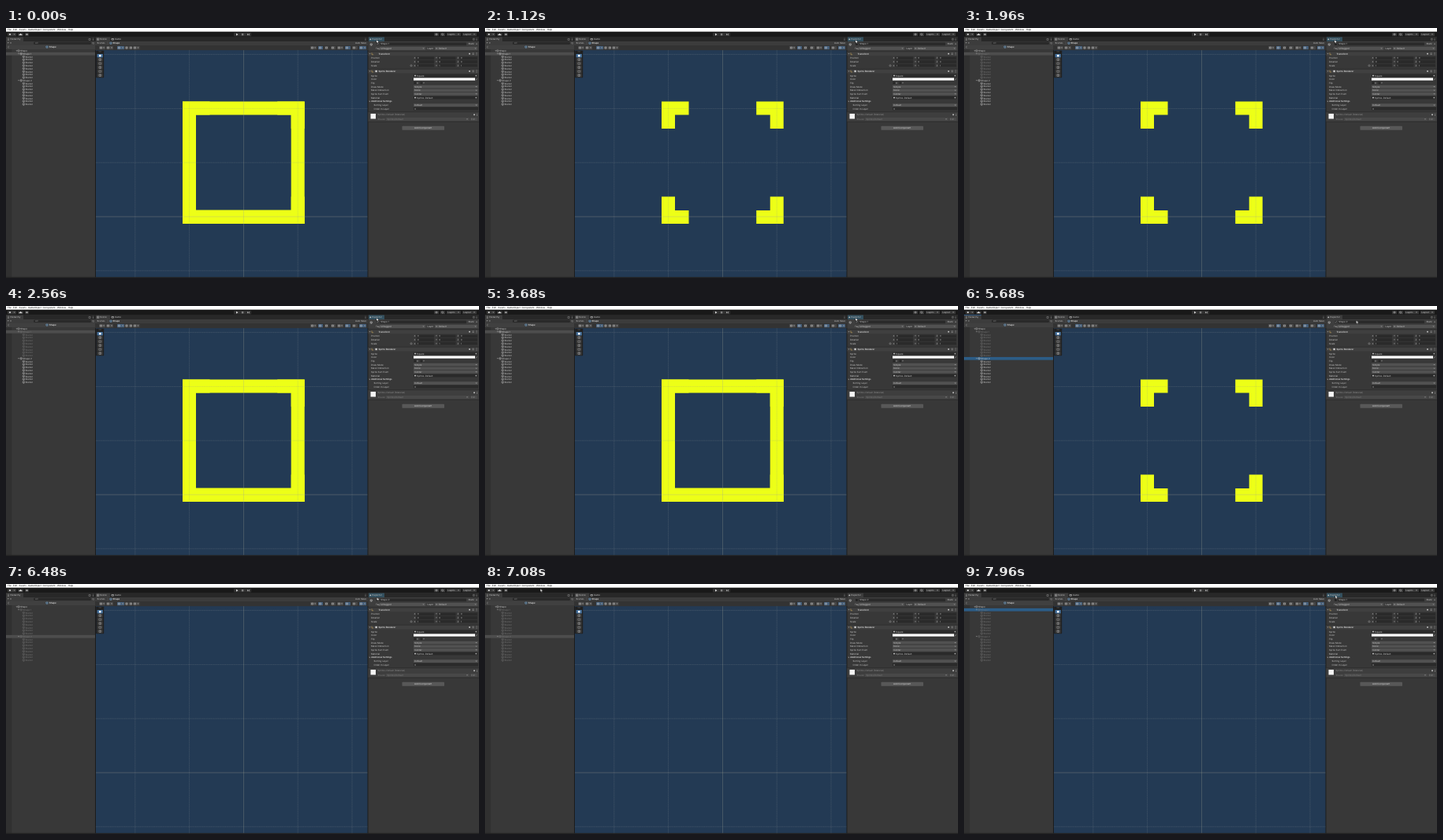
An HTML page for the animation above (8000 ms loop, 600 px wide and 318 px high).

```html
<!DOCTYPE html>
<html lang="en">
<head>
<meta charset="utf-8">
<title>Editor scene</title>
<style>
html, body { margin: 0; width: 100%; height: 100%; overflow: hidden; background: #383838; }
svg { display: block; width: 100vw; height: 100vh; }
text { font: 2.9px Inter, sans-serif; fill: #c4c4c4; text-rendering: geometricPrecision; white-space: pre; }
</style>
</head>
<body>
<svg id="stage" viewBox="0 0 600 318"></svg>
<script>
const LOOP = 8000;
const stage = document.getElementById('stage');
let layer = stage;

function add(tag, attrs, content) {
  const el = document.createElementNS('http://www.w3.org/2000/svg', tag);
  for (const key in attrs) el.setAttribute(key, attrs[key]);
  if (content) el.textContent = content;
  layer.append(el);
  return el;
}
const box = (x, y, w, h, fill, extra) => add('rect', { x, y, width: w, height: h, fill, ...extra });
const path = (d, fill, extra) => add('path', { d, fill, ...extra });
const stroke = (d, color, width = 0.5, extra) =>
  path(d, 'none', { stroke: color, 'stroke-width': width, ...extra });
// y is the vertical middle of the line of text
const label = (x, y, content, style = '') => add('text', { x, y: y + 1.05, style }, content);
const bold = 'font-weight:600;fill:#d8d8d8';

function group(draw) {
  const outer = layer;
  const g = add('g', {});
  layer = g;
  draw();
  layer = outer;
  return g;
}

// steps: [ms, value]; each value holds until the next step
function hold(el, prop, steps) {
  const frames = steps.map(([ms, value]) => ({ offset: ms / LOOP, [prop]: value, easing: 'step-end' }));
  frames.push({ ...frames.at(-1), offset: 1 });
  el.animate(frames, { duration: LOOP, iterations: Infinity });
}

const T = {
  off1: 1110, dim1: 1230, on: 2550, lit: 2680, off2: 3690, dim2: 3810,
  press: 4710, select2: 4830, empty: 6190, dimAll: 6310, select1: 7470
};
const squareSteps = [[0, 1], [T.off1, 0], [T.on, 1], [T.off2, 0]];
const cornerSteps = [[0, 1], [T.empty, 0]];
const BRIGHT = '#c4c4c4', DIM = '#717171', GRAY = '#4d4d4d', BLUE = '#2c5d87';
const firstTree = [[0, BRIGHT], [T.dim1, DIM], [T.lit, BRIGHT], [T.dim2, DIM]];
const secondTree = [[0, BRIGHT], [T.dimAll, DIM]];

function cube(x, y, color = '#b0b0b0') {
  return stroke(`M${x} ${y - 1.4}l1.3 .7v1.4l-1.3 .7-1.3-.7v-1.4zm0 1.4v1.4m0-1.4l1.3-.7m-1.3 .7l-1.3-.7`, color, 0.4);
}
const arrow = (x, y) => path(`M${x - 1} ${y - .6}h2l-1 1.4z`, '#999');
const dots = (x, y) => [-1.2, 0, 1.2].forEach(d => box(x - .35, y + d - .3, .7, .6, '#b5b5b5'));

function field(x, y, w, content, fill = '#2a2a2a') {
  box(x, y - 1.9, w, 3.8, fill, { rx: .4 });
  if (content) label(x + 1.3, y, content);
}
function dropdown(x, y, w, content) {
  field(x, y, w, content, '#515151');
  arrow(x + w - 2.5, y);
}

function topBars() {
  box(0, 0, 600, 4.8, '#fff');
  [[2, 'File'], [9, 'Edit'], [16.5, 'Assets'], [28, 'GameObject'], [46.5, 'Component'], [65, 'Window'], [79, 'Help']]
    .forEach(([x, name]) => label(x, 2.4, name, 'fill:#111'));
  box(0, 4.8, 600, 6.4, '#191919');
  box(2, 6.2, 11, 4, '#383838', { rx: .5 });
  add('circle', { cx: 5, cy: 8.2, r: 1.1, fill: '#ccc' });
  arrow(10.5, 8.2);
  box(15, 6.2, 7, 4, '#303030', { rx: .5 });
  path('M16.5 9.3q-.5-1.5 1-1.4 1-1.8 2.1 0 1.5 0 .9 1.4z', '#d5d5d5');
  box(24, 6.2, 5, 4, '#303030', { rx: .5 });
  box(25.2, 7.2, 2.6, 2, '#999');
  box(289, 6, 22, 4.6, '#303030', { rx: .5 });
  path('M292 6.8l2.5 1.5-2.5 1.5z', '#d5d5d5');
  path('M299 7h.8v2.6h-.8zm1.5 0h.8v2.6h-.8zM306 7l2 1.3-2 1.3zm2.2 0h.7v2.6h-.7z', '#aaa');
  [[543, 6], [551, 6], [559, 18], [579, 18]].forEach(([x, w]) => box(x, 6.2, w, 4, '#383838', { rx: .5 }));
  stroke('M545 7.3h2v1.6h-2z M553.6 7.1a1 1 0 1 0 .1 0m.6 1.7l.8.8', '#c4c4c4');
  label(560.5, 8.2, 'Layers');
  label(580.5, 8.2, 'Layout');
  arrow(574, 8.2);
  arrow(594, 8.2);
}

function hierarchy() {
  box(0, 11.2, 113, 306, '#383838');
  box(0, 11.2, 113, 5.8, '#282828');
  box(0, 11.6, 22, 5.4, '#3c3c3c');
  const focus = box(0, 11.4, 22, .6, '#3a79bb');
  hold(focus, 'opacity', [[0, 0], [T.press, 1], [T.empty, 0], [T.select1, 1], [7900, 0]]);
  stroke('M2 13.2h2m-2 1.2h2m-2 1.2h2', '#b5b5b5', .4);
  label(5.2, 14.3, 'Hierarchy');
  stroke('M105 13.5h2.2v2h-2.2z', '#aaa', .4);
  dots(110.5, 14.3);
  box(0, 17, 113, 4.5, '#3c3c3c');
  label(1.5, 19, '+', 'font-size:4px');
  arrow(6, 19.2);
  box(35, 17.5, 73, 3.5, '#292929', { rx: 1.5 });
  label(37, 19.2, 'All', 'fill:#888');
  stroke('M110.5 18.3a.9.9 0 1 0 .1 0m.5 1.5l.7.7', '#aaa', .4);
  box(0, 21.5, 113, 5.5, '#404040');
  stroke('M3.8 23l-1.3 1.2 1.3 1.2', '#aaa');
  cube(52, 24.1, '#7bb5e8');
  label(54.8, 24.1, 'Shape', bold);
  box(0, 27, 7.3, 290, '#303030');

  const pitch = 3.78, top = 29;
  const rowY = i => top + i * pitch;
  const highlight = (row, steps) => {
    const bar = box(0, rowY(row) - pitch / 2, 113, pitch, GRAY);
    hold(bar, 'fill', steps);
  };
  highlight(1, [[0, GRAY], [T.press, 'transparent'], [T.select1, BLUE]]);
  highlight(10, [[0, 'transparent'], [T.press, GRAY], [T.select2, BLUE], [T.empty, GRAY], [T.select1, 'transparent']]);
  const hover = group(() => {
    stroke(`M1 ${rowY(10)}q1.2-1.6 2.4 0-1.2 1.6-2.4 0M5 ${rowY(10) - 1}v2h1.2v-2`, '#aaa', .4);
  });
  hold(hover, 'opacity', [[0, 0], [4580, 1], [5320, 0]]);

  arrow(13.5, top);
  cube(16, top);
  label(18.2, top, 'Shape');
  [firstTree, secondTree].forEach((steps, n) => {
    for (let i = 0; i < 9; i++) {
      const y = rowY(1 + n * 9 + i);
      const indent = i ? 3.2 : 0;
      if (!i) arrow(16, y);
      const icon = cube(19.2 + indent, y);
      const name = label(21.6 + indent, y, i ? 'Border' : `Shape ${n + 1}`);
      hold(icon, 'stroke', steps);
      hold(name, 'fill', steps);
    }
  });
}

function scene() {
  box(114, 28, 344.5, 289, '#233a54');
  const yellow = '#edff17';
  const square = path('M224 93.5H378.7V249H224ZM241 110.5V231.5H361.7V110.5Z', yellow, { 'fill-rule': 'evenodd' });
  hold(square, 'opacity', squareSteps);
  const corners = group(() => {
    for (const [x, sx] of [[224, 1], [378.7, -1]])
      for (const [y, sy] of [[93.5, 1], [249, -1]])
        path('M0 0H34.5V17H17V34.5H0Z', yellow, { transform: `translate(${x} ${y}) scale(${sx} ${sy})` });
  });
  hold(corners, 'opacity', cornerSteps);

  const step = 68.8;
  for (let i = -2; i <= 2; i++) {
    const x = 301.4 + i * step, y = 240 + (i - 1) * step;
    const line = (d, axis) => stroke(d, axis ? '#a0a395' : '#8c9499', .6,
      axis ? { opacity: .55 } : { opacity: .43, 'stroke-dasharray': '1.2 .6' });
    line(`M${x} 28V317`, i === 0);
    if (y > 28) line(`M114 ${y}H458.5`, i === 1);
  }

  box(113, 11.2, 346, 5.8, '#282828');
  box(114, 11.6, 18, 5.4, '#3c3c3c');
  stroke('M115.5 13h2.4v2.6h-2.4zm1.2 0v2.6m-1.2-1.3h2.4', '#bbb', .4);
  label(119, 14.3, 'Scene');
  stroke('M134 13.5h2.6v1.6h-2.6z', '#ccc', .6);
  label(138, 14.3, 'Game');
  dots(456, 14.3);
  box(113, 17, 346, 5, '#3c3c3c');
  label(115.5, 19.3, 'Scenes');
  stroke('M128.5 17.5l1 1.8-1 1.8', '#666', .4);
  cube(133, 19.3, '#7bb5e8');
  label(135.5, 19.3, 'Shape', bold);
  label(443, 19.3, 'Auto Save');
  box(113, 22, 346, 6.2, '#333');

  const button = (x, w, active) => {
    box(x, 23, w, 4.3, active ? '#46607c' : '#484848', { rx: .5 });
    stroke(`M${x + 1.5} 24.2h2v1.9h-2z`, '#d0d0d0', .5);
    if (w > 7) arrow(x + w - 2, 25.2);
  };
  [[118, 8], [127, 9], [141, 9, 1], [150.5, 5], [156, 4], [161, 8.5],
   [386, 8], [396, 6, 1], [404, 5], [412, 6], [420, 8], [430, 7, 1], [439, 7], [448, 9, 1]]
    .forEach(b => button(...b));
  box(114.2, 28.7, 10, 34.5, '#202020', { rx: .6 });
  stroke('M117.5 30h3.5', '#666', .5);
  for (let i = 0; i < 6; i++) {
    const y = 35.2 + i * 5;
    box(115.6, y - 2.1, 7.3, 4.3, i ? '#383838' : '#46719c', { rx: .5 });
    if (i) stroke(`M118 ${y - 1.2}h2.6v2.4h-2.6z${i % 2 ? `M119.3 ${y - 1.8}v3.6` : ''}`, '#b5b5b5', .4);
    else path(`M118 ${y + 1}l.2-2.3h2.3v2.3l-1.2 .6z`, '#fff');
  }
}

function inspector() {
  box(459.5, 11.2, 140.5, 306, '#383838');
  box(459.5, 11.2, 140.5, 5.8, '#282828');
  box(460, 11.6, 20, 5.4, '#3c3c3c');
  const glow = box(460, 11.6, 20, 5.4, '#30576b');
  hold(glow, 'opacity', [[0, .75], [4240, 0], [6050, .75], [6840, 0], [7900, .75]]);
  add('circle', { cx: 462.3, cy: 14.3, r: .9, fill: '#ccc' });
  label(464, 14.3, 'Inspector');
  stroke('M592.5 13.3h1.8v2h-1.8z', '#aaa', .4);
  dots(597, 14.3);

  box(459.5, 17, 140.5, 11.5, '#3e3e3e');
  cube(463.3, 21, '#ddd');
  box(470, 18.9, 3, 3, '#252525', { rx: .3 });
  const check = stroke('M470.7 20.4l.7.8 1.2-1.7', '#ddd');
  hold(check, 'opacity', [[0, 1], [T.off1, 0], [T.on, 1], [T.off2, 0], [T.select2, 1], [T.empty, 0]]);
  field(474, 20.4, 110, '');
  const one = label(475.3, 20.4, 'Shape 1');
  const two = label(475.3, 20.4, 'Shape 2');
  hold(one, 'opacity', [[0, 1], [T.select2, 0], [T.select1, 1]]);
  hold(two, 'opacity', [[0, 0], [T.select2, 1], [T.select1, 0]]);
  label(586.5, 20.4, 'Static');
  arrow(597, 20.4);
  label(469, 26, 'Tag');
  dropdown(474, 26, 58, 'Untagged');
  label(534.5, 26, 'Layer');
  dropdown(544, 26, 54, '0: Default');

  const header = (y, name, check) => {
    box(459.5, y - 2.8, 140.5, 5.3, '#404040');
    stroke(`M459.5 ${y - 2.8}h140.5`, '#222', .5);
    arrow(461.5, y);
    stroke(`M464 ${y + 1}v-2.4m0 2.4h2.2`, '#c7a35b', .6);
    if (check) box(468.4, y - 1.2, 2.4, 2.4, '#ccc');
    label(472.6, y, name, bold);
    add('circle', { cx: 588, cy: y, r: 1, fill: '#bbb' });
    stroke(`M591.5 ${y - .8}h2.2m-2.2 1.6h2.2`, '#bbb', .5);
    dots(597, y);
  };
  header(32.8, 'Transform');
  ['Position', 'Rotation', 'Scale'].forEach((name, i) => {
    const y = 38.3 + i * 4.7;
    label(463, y, name);
    ['X', 'Y', 'Z'].forEach((axis, k) => {
      label(517.5 + k * 27.5, y, axis);
      field(520.5 + k * 27.5, y, 22.5, i === 2 ? '1' : '0');
    });
  });
  stroke('M513 46.9h2v1.8h-2z', '#aaa', .4);
  header(55, 'Sprite Renderer', true);

  const rowY = i => 60.6 + i * 4.67;
  ['Sprite', 'Color', 'Flip', 'Draw Mode', 'Mask Interaction', 'Sprite Sort Point', 'Material']
    .forEach((name, i) => label(463, rowY(i), name));
  [[0, 'Square'], [6, 'Sprites-Default']].forEach(([i, name]) => {
    field(517, rowY(i), 81, '');
    box(518.2, rowY(i) - .8, 1.6, 1.6, '#ddd');
    label(520.8, rowY(i), name);
    add('circle', { cx: 596.3, cy: rowY(i), r: .9, fill: '#aaa' });
  });
  box(517, rowY(1) - 1.8, 78, 3.2, '#fff');
  stroke('M596 66.4l1.6-1.9', '#ccc');
  ['X', 'Y'].forEach((axis, k) => {
    box(517.5 + k * 8, rowY(2) - 1.3, 2.6, 2.6, '#252525');
    label(521 + k * 8, rowY(2), axis);
  });
  ['Simple', 'None', 'Center'].forEach((name, i) => dropdown(517, rowY(3 + i), 82, name));
  arrow(461.3, 93.4);
  label(463.2, 93.4, 'Additional Settings', bold);
  label(466.5, 98.1, 'Sorting Layer');
  dropdown(517, 98.1, 82, 'Default');
  label(466.5, 102.7, 'Order in Layer');
  field(517, 102.7, 82, '0');

  box(459.5, 106.7, 140.5, 12.6, '#3e3e3e');
  stroke('M459.5 106.7h140.5M459.5 119.3h140.5', '#252525');
  box(462.5, 109, 6.5, 6.5, '#f5f5f5');
  label(471.5, 110.3, 'Sprites-Default (Material)', 'fill:#888');
  add('circle', { cx: 594, cy: 110.3, r: 1, fill: '#bbb' });
  dots(597.5, 110.3);
  label(471.5, 116, 'Shader', 'fill:#777');
  field(482, 116, 106, '', '#484848');
  label(483.5, 116, 'Sprites/Default', 'fill:#777');
  arrow(585, 116);
  field(589, 116, 9, '', '#484848');
  label(590, 116, 'Edit', 'fill:#888');
  box(502.5, 124.8, 53.5, 5, '#585858', { rx: .6 });
  label(518, 127.3, 'Add Component', 'fill:#e0e0e0');
}

function pointer() {
  const cursor = path('M0 0V4.1L1 3.2 1.7 4.7 2.4 4.4 1.8 3H3.1Z', '#fff', { stroke: '#000', 'stroke-width': .35 });
  const stops = [
    [0, 470, 15], [4120, 470, 15], [4240, 330, 4], [4380, 150, 12], [4560, 50, 61.5],
    [5240, 50, 61.5], [5400, 190, 48], [5640, 497.5, 18.3], [5900, 497.5, 18.3],
    [6060, 470.5, 17], [6820, 470.5, 17], [7060, 70.5, 5.7], [7100, 70, 6], [7340, 46, 31],
    [7590, 46, 31], [7760, 260, 22], [7900, 471, 14.3], [LOOP, 471, 14.3]
  ];
  cursor.animate(
    stops.map(([ms, x, y]) => ({ offset: ms / LOOP, transform: `translate(${x}px, ${y}px)` })),
    { duration: LOOP, iterations: Infinity }
  );
}

box(0, 0, 600, 318, '#1c1c1c');
topBars();
hierarchy();
scene();
inspector();
box(0, 316.8, 600, 1.2, '#222');
pointer();
</script>
</body>
</html>
```
